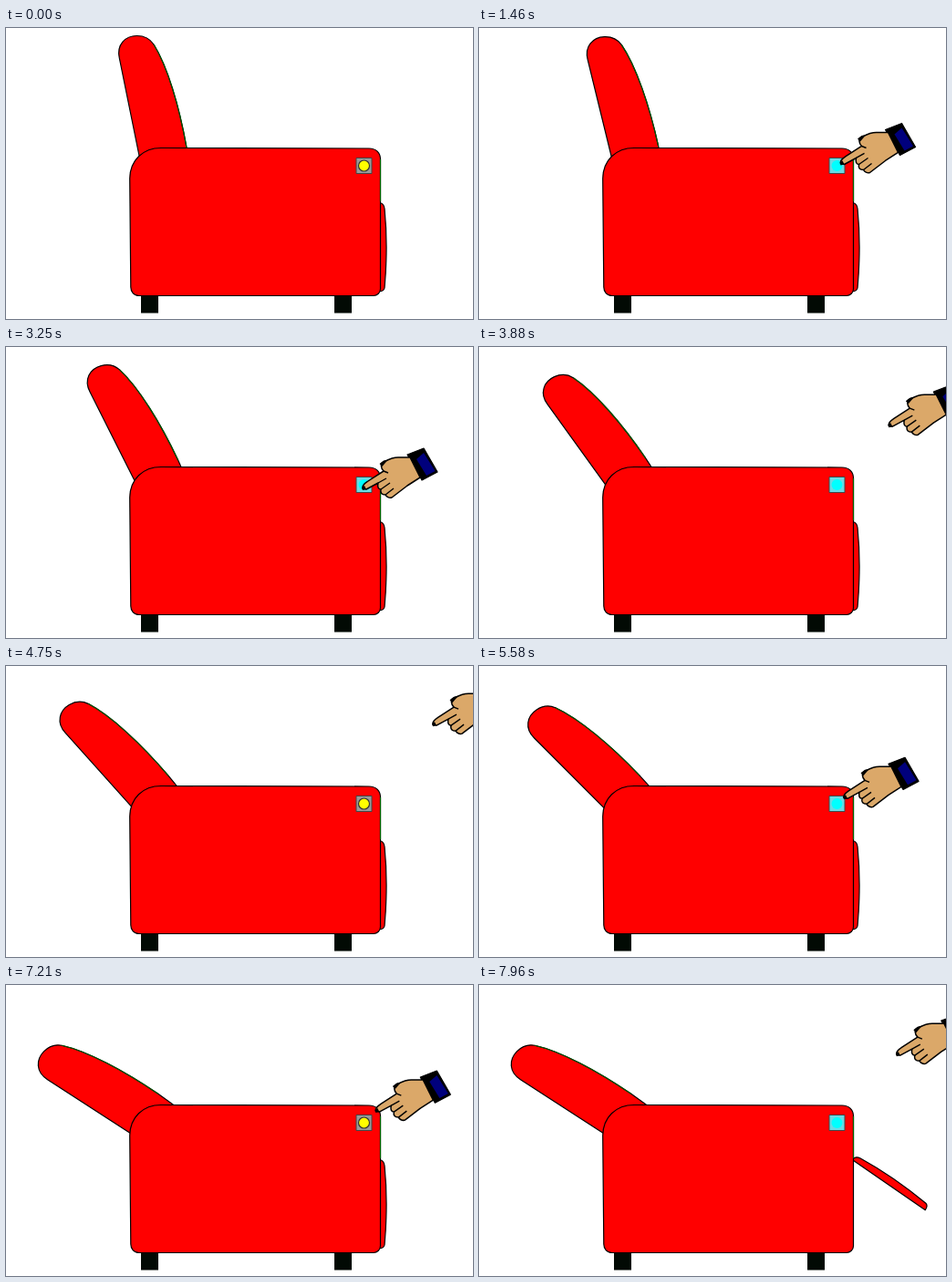
Animation, 512 px wide and 319 px high, one loop 8000 ms. Source, as an HTML page:

```html
<!DOCTYPE html>
<html lang="en">
<head>
<meta charset="utf-8">
<title>Recliner chair</title>
<style>
  html, body { margin: 0; width: 100%; height: 100%; overflow: hidden; background: #fff; }
  svg { display: block; width: 100%; height: 100%; }
</style>
</head>
<body>
<svg viewBox="0 0 512 319" stroke="#000" stroke-width="1.2" stroke-linejoin="round">
  <g stroke="none" fill="#020a04">
    <rect x="148" y="293" width="19" height="19.5"/>
    <rect x="360" y="293" width="19" height="19.5"/>
  </g>
  <g id="back">
    <path fill="#f00" d="M150.500 162 L124.3 33 C121 18 131 8.5 143.5 8.5 C152 8.5 158 12 162 18 C177 42 190 86 198 131 L202.500 160 Z"/>
    <path fill="none" stroke="#050" d="M162 18 C177 42 190 86 198 131"/>
  </g>
  <path id="foot" fill="#f00" d="M408.600 191.5 C413 191.5 414.5 194 415 198 C417.6 224 417.6 256 415 285 C414.5 287.500 412.500 288.700 408.600 288.700 Z"/>
  <path fill="#f00" d="M135.700 165 C136 145 150 131.5 170 131.5 L398 132 C406 132 410.5 137 410.5 144 V286 C410.5 290 407 293.500 403 293.500 H146 C140 293.500 136.800 289 136.800 284 Z"/>
  <path fill="none" stroke="#060" d="M410.500 144 V190"/>
  <rect id="plate" x="384" y="142.5" width="17" height="17" stroke="#444" stroke-width="1"/>
  <circle id="lamp" cx="392.5" cy="151" r="6"/>
  <g id="hand">
    <path d="M49 -34 L67 -41 L82 -15 L65 -6 Z"/>
    <path fill="#00007c" stroke="none" d="M59 -29 L67 -36 L79.500 -16 L70 -11 Z"/>
    <path fill="#dba869" stroke-width="1.5" d="M0 3 C-1 -1 3 -3 6 -5 L23 -16 C20 -19 19 -25 23 -26 C27 -28 32 -31 39 -31 L52 -31 L63 -9 L49 0 L32 13 C29 14 26 12 25 10 C21 10 19 8 20 4 C17 4 16 1 17 -3 L4 4 Z"/>
    <path fill="none" stroke-width="1.4" d="M17 -3 L26 -8 M20 4 L30 -3 M25 10 L34 3 M23 -16 L28 -14"/>
    <path stroke="none" d="M18.500 -24 L23 -27.500 L28 -28.500 L24 -24 L21.500 -21 Z M-1 2 L2 0 L4 4 L0 5 Z"/>
  </g>
</svg>
<script>
  const LOOP = 8000, RATE = 24;
  const LEAN = 15.2, LIFT = 85.4;      // degrees per press
  const IN = 19, OUT = 20, LIT = 23;   // lengths in ticks
  const REST = [391, 152];

  // tick when the finger touches the button, tick before the chair moves
  const presses = [
    { touch: 30, go: 32 },
    { touch: 78, go: 81 },
    { touch: 127, go: 130 },
    { touch: 176, go: 178 }
  ];

  const [back, foot, plate, lamp, hand] =
    ['back', 'foot', 'plate', 'lamp', 'hand'].map(id => document.getElementById(id));
  const clamp = v => Math.max(0, Math.min(1, v));

  // distance of the finger from the button, or null while out of view
  function reach(n) {
    const p = presses.find(p => n >= p.touch - IN && n <= p.go + OUT);
    if (!p) return null;
    if (n < p.touch) return 119 * Math.pow((p.touch - n) / IN, 1.147);
    return 139 * Math.pow(clamp((n - p.go) / OUT), 1.7);
  }

  function draw(ms) {
    const n = Math.floor((ms % LOOP) * RATE / 1000 + 0.1);
    const part = presses.map(p => clamp((n - p.go) / OUT));
    const lean = (part[0] + part[1] + part[2]) * LEAN;
    back.setAttribute('transform', `rotate(${-lean} 169 162)`);
    foot.setAttribute('transform', `rotate(${-part[3] * LIFT} 409 191)`);

    const lit = presses.some(p => n >= p.touch && n < p.touch + LIT);
    plate.setAttribute('fill', lit ? '#6cd9e2' : '#9a9a9a');
    lamp.setAttribute('fill', lit ? '#0ff' : '#ff0');
    lamp.setAttribute('stroke', lit ? 'none' : '#333');

    const d = reach(n);
    hand.style.display = d === null ? 'none' : '';
    if (d !== null) {
      hand.setAttribute('transform', `translate(${REST[0] + d} ${REST[1] - d * 1.18})`);
    }
  }

  const start = performance.now();
  function tick() {
    draw(performance.now() - start);
    requestAnimationFrame(tick);
  }
  tick();
</script>
</body>
</html>
```
